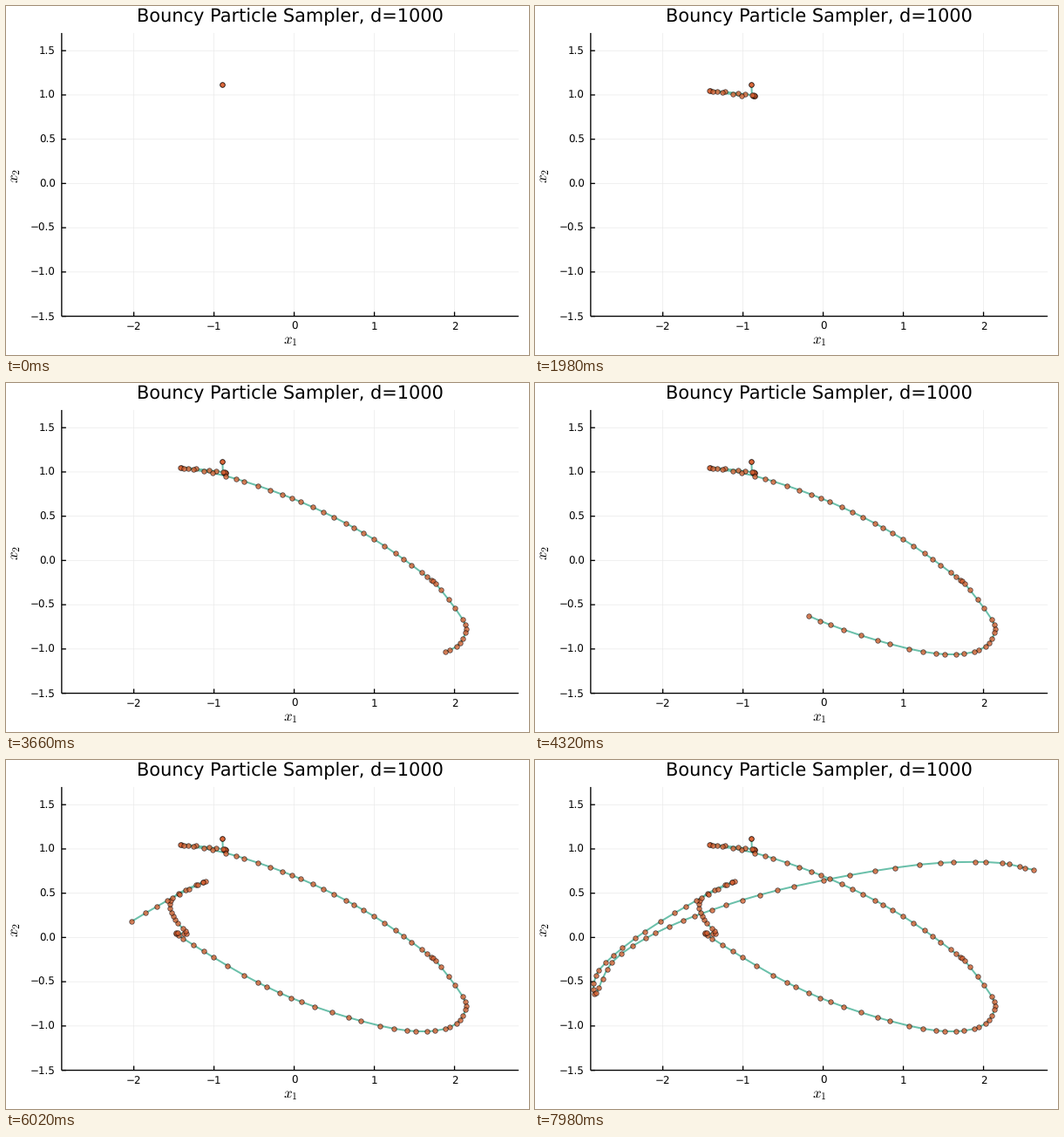
Write a matplotlib script that moves like this. It is 600x400 px and loops after 8 s.

```python
import matplotlib.pyplot as plt
import numpy as np
from matplotlib.animation import FuncAnimation
from matplotlib.collections import LineCollection
from matplotlib.patches import Rectangle

W, H, DPI = 600, 400, 100
PX = 72 / DPI
LOOP_MS, TICK_MS = 8000, 20

plt.rcParams["font.family"] = "DejaVu Sans"
plt.rcParams["mathtext.fontset"] = "cm"
plt.rcParams["text.hinting"] = "none"

fig = plt.figure(figsize=(W / DPI, H / DPI), dpi=DPI, facecolor="white")
ax = fig.add_axes([0, 0, 1, 1])
ax.set_xlim(0, W)
ax.set_ylim(H, 0)
ax.axis("off")


def px_x(value):
    return 330.6 + 91.98 * value


def px_y(value):
    return 203.4 - 101.45 * value


LEFT, RIGHT = px_x(-2.9), px_x(2.8)
TOP, BOTTOM = px_y(1.7), px_y(-1.5)


def label(x, y, text, size, ha="center", **kw):
    ax.text(x, y, text, fontsize=size * PX, ha=ha, va="baseline", **kw)


def rules(segments, color, width):
    ax.add_collection(LineCollection(segments, colors=color, linewidths=width * PX,
                                     snap=False, zorder=1))


def minus(text):
    return text.replace("-", "\u2212")


def draw_axes():
    xs, ys = np.arange(-2, 3), np.arange(-1.5, 1.6, 0.5)
    grid = [[(px_x(v), TOP), (px_x(v), BOTTOM)] for v in xs]
    grid += [[(LEFT, px_y(v)), (RIGHT, px_y(v))] for v in ys]
    rules(grid, "#eaeaea", 0.7)
    frame = [[(LEFT, TOP), (LEFT, BOTTOM)], [(LEFT, BOTTOM), (RIGHT, BOTTOM)]]
    frame += [[(px_x(v), BOTTOM), (px_x(v), BOTTOM - 5)] for v in xs]
    frame += [[(LEFT, px_y(v)), (LEFT + 5, px_y(v))] for v in ys]
    rules(frame, "black", 1.33)
    for v in xs:
        label(px_x(v), 370.9, minus(f"{v:d}"), 11.9)
    for v in ys:
        label(56.8, px_y(v) + 4, minus(f"{v:.1f}"), 11.9, ha="right")
    label(326.2, 18.3, "Bouncy Particle Sampler, d=1000", 20.83)
    label(326, 387, "$x_1$", 17)
    label(14.3, 194, "$x_2$", 17, rotation=90, rotation_mode="anchor")


def spline(at, keys):
    """Cubic Hermite curve through keys of (step, x, y)."""
    keys = np.array(keys, float)
    steps, points = keys[:, 0], keys[:, 1:]
    slopes = np.gradient(points, steps, axis=0)
    i = np.clip(np.searchsorted(steps, at) - 1, 0, len(steps) - 2)
    span = (steps[i + 1] - steps[i])[:, None]
    u = (at - steps[i])[:, None] / span
    blend = u * u * (3 - 2 * u)
    return (points[i] * (1 - blend) + points[i + 1] * blend
            + span * u * (1 - u) * (slopes[i] * (1 - u) - slopes[i + 1] * u))


START, CORNER = (248.3, 89.8), (248.9, 103.4)
GROW_STEPS, LAST_STEP = 23, 167

# Turning points of the trajectory: step, x, y in stage pixels.
KEYS = [(GROW_STEPS, *CORNER), (29, 248.5, 102), (35, 200, 97), (40, 250, 106),
        (45, 315, 127), (54, 422, 179), (60, 483, 222), (64, 498, 236),
        (67, 524, 271), (70, 527, 287), (74, 510, 306), (79, 459, 310),
        (86, 341, 278), (90, 287, 254), (96, 204, 205), (99, 194.5, 198),
        (102, 207, 199), (106, 194, 183), (112, 192, 157), (117, 229, 139),
        (122, 187, 160), (126, 127, 196), (131, 74, 240), (136, 70, 268),
        (140, 90, 230), (144, 139, 198), (148, 201, 172.5), (153, 301, 144),
        (158, 440, 120), (162, 520, 117), (LAST_STEP, 572.4, 126)]

# Bounces come at slightly uneven times.
rng = np.random.default_rng(4)
bounce_at = np.arange(GROW_STEPS + 1, LAST_STEP + 1) + rng.uniform(-0.2, 0.2, LAST_STEP - GROW_STEPS)
bounce_at[-1] = LAST_STEP
bounces = spline(bounce_at, KEYS)
markers = np.vstack([START, START, bounces])

draw_axes()
plot_area = Rectangle((LEFT, TOP), RIGHT - LEFT, BOTTOM - TOP, transform=ax.transData)
trail, = ax.plot([], [], color=(0.1, 0.62, 0.49, 0.65), lw=2 * PX, snap=False, zorder=2)
dots = ax.scatter([], [], s=(5.5 * PX) ** 2, facecolors=[(0.87, 0.39, 0.2, 0.78)],
                  edgecolors=[(0, 0, 0, 0.6)], linewidths=0.9 * PX, snap=False, zorder=3)
trail.set_clip_path(plot_area)
dots.set_clip_path(plot_area)


def steps_done(ms):
    """Steps come in quick triples, one triple every 140 ms."""
    if ms < 260:
        return 0
    triples, rest = divmod(ms - 260, 140)
    return 3 * triples + min(rest // 20, 2) + 1


def update(frame):
    n = steps_done(frame * TICK_MS)
    tip = (CORNER[0], min(92.85 + 0.46 * n, CORNER[1])) if n else START
    seen = max(n - GROW_STEPS, 0)
    trail.set_data(*np.vstack([START, tip, bounces[:seen]]).T)
    dots.set_offsets(markers[:2 + seen])
    return trail, dots


anim = FuncAnimation(fig, update, frames=LOOP_MS // TICK_MS, interval=TICK_MS,
                     repeat=True, repeat_delay=0, blit=False)
plt.show()
```
